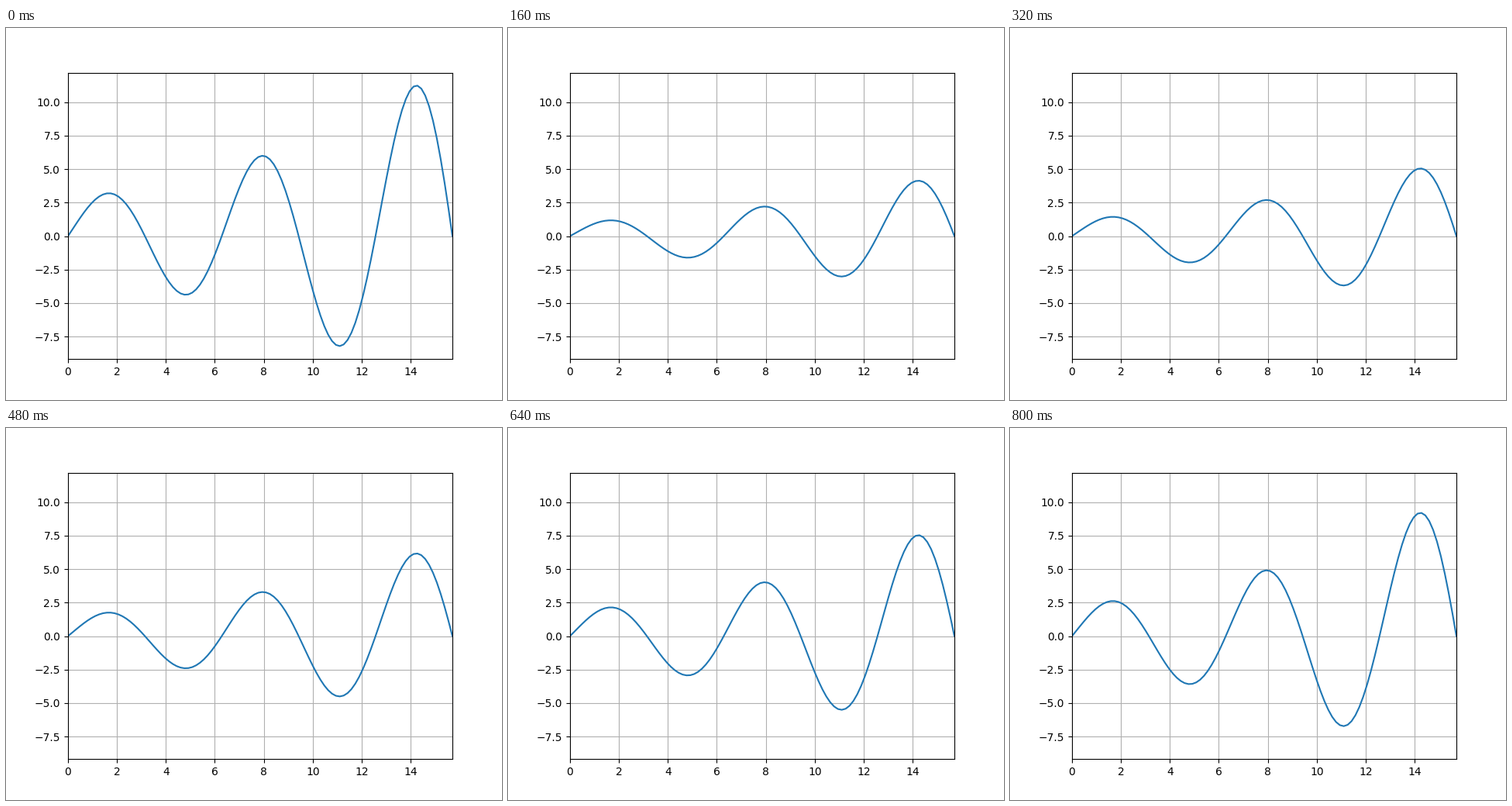
Recreate the animation shown at these times as a matplotlib script. Size 640 px wide and 480 px high, loop 0.96 s.

```python
import numpy as np
import matplotlib.pyplot as plt
from matplotlib.animation import FuncAnimation

FRAMES = 6
INTERVAL = 160
X_MAX = 5 * np.pi

x = np.linspace(0, X_MAX, 100)


def wave(growth):
    return np.exp(growth + 0.1 * x) * np.sin(x)


def growth_at(frame):
    # Starts at full height, then drops to 0 and climbs in steps of 0.2.
    return 1.0 if frame == 0 else 0.2 * (frame - 1)


fig, ax = plt.subplots(figsize=(6.4, 4.8), dpi=100)
tallest = wave(1.0)
line, = ax.plot(x, tallest)

margin = 0.05 * np.ptp(tallest)
ax.set_xlim(0, X_MAX)
ax.set_ylim(tallest.min() - margin, tallest.max() + margin)
ax.grid(True)


def update(frame):
    line.set_ydata(wave(growth_at(frame)))
    return line,


anim = FuncAnimation(fig, update, frames=FRAMES, init_func=lambda: update(0),
                     interval=INTERVAL, repeat=True, repeat_delay=0)
plt.show()
```
